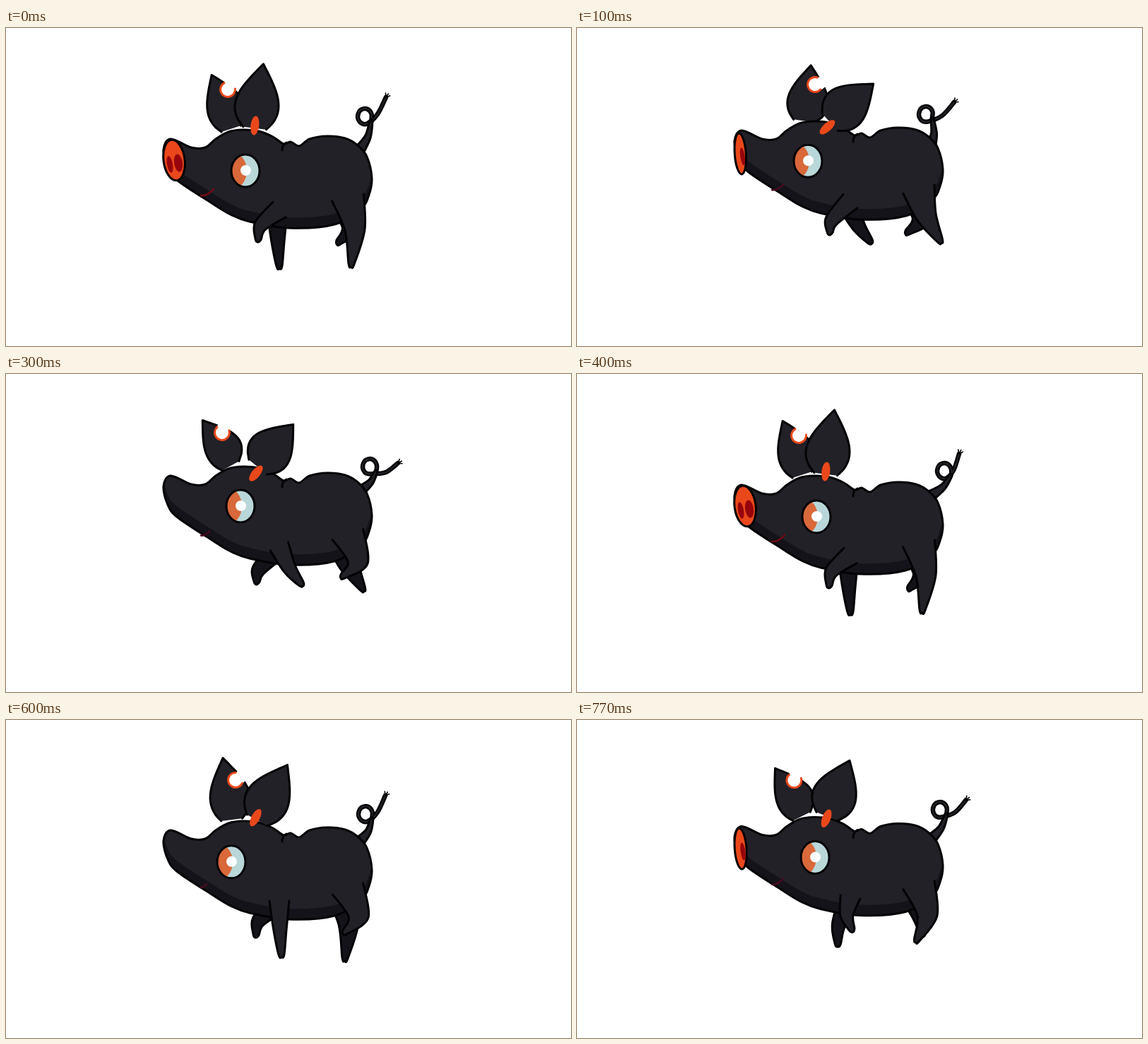
An HTML page that plays this animation: 800x450 px, repeating every 800 ms.

```html
<!DOCTYPE html>
<html lang="en">
<head>
<meta charset="utf-8">
<title>Running pig</title>
<style>
html, body { margin: 0; width: 100%; height: 100%; overflow: hidden; background: #fff; }
svg { display: block; width: 100vw; height: 100vh; }
path, ellipse { stroke-linecap: round; stroke-linejoin: round; }
</style>
</head>
<body>
<svg id="stage" viewBox="0 0 800 450"></svg>
<script>
const SKIN = '#222127', SHADE = '#15131a', INK = '#030204', ORANGE = '#ea481b', RED = '#97050c';
const torso = [
  [233, 157], [262, 169], [282, 169], [297, 157], [315, 147], [335, 144], [358, 146], [378, 154],
  [393, 164], [403, 161], [415, 167], [430, 157], [455, 153], [480, 156], [498, 166], [511, 182],
  [518, 212], [514, 236], [503, 255], [465, 278], [400, 283], [345, 274], [318, 264], [290, 247],
  [243, 216], [229, 198], [223, 172]
];

// Smooth loop through evenly spaced key values; u runs from 0 to 1.
function cycle(u, ...keys) {
  const n = keys.length, s = (u % 1) * n, i = Math.floor(s), k = s - i;
  const [a, b, c, d] = [-1, 0, 1, 2].map(j => keys[(i + j + n) % n]);
  return b + k * ((c - a) / 2 + k * (a - 2.5 * b + 2 * c - d / 2 + k * (1.5 * (b - c) + (d - a) / 2)));
}

// Smooth curve through points.
function curve(pts, closed) {
  const n = pts.length;
  const get = i => closed ? pts[(i + n) % n] : pts[Math.max(0, Math.min(n - 1, i))];
  let d = 'M' + pts[0];
  for (let i = 0; i < (closed ? n : n - 1); i++) {
    const [a, b, c, e] = [get(i - 1), get(i), get(i + 1), get(i + 2)];
    const h1 = b.map((v, j) => v + (c[j] - a[j]) / 6);
    const h2 = c.map((v, j) => v - (e[j] - b[j]) / 6);
    d += `C${h1} ${h2} ${c}`;
  }
  return d + (closed ? 'Z' : '');
}

// Tapered limb over three joints, open at the top.
function limb(joints, widths) {
  const [a, b, c] = joints;
  const heads = [[a, b], [a, c], [b, c]].map(([p, q]) => Math.atan2(q[1] - p[1], q[0] - p[0]));
  const side = sign => joints.map(([x, y], i) =>
    [x - sign * widths[i] * Math.sin(heads[i]), y + sign * widths[i] * Math.cos(heads[i])]);
  const tip = [c[0] + widths[2] * Math.cos(heads[2]), c[1] + widths[2] * Math.sin(heads[2])];
  return curve([...side(1), tip, ...side(-1).reverse()]);
}

// Leaf-shaped ear; the angle is measured from upright.
function ear(x, y, angle, length, left, right) {
  const a = angle * Math.PI / 180, cos = Math.cos(a), sin = Math.sin(a);
  const pts = [];
  for (let i = 1; i <= 19; i++) {
    const u = 1 - Math.abs(i - 10) / 10;
    const w = Math.sin(Math.PI * u ** 0.75) * (i < 10 ? -left : right);
    pts.push([x + w * cos + u * length * sin, y + w * sin - u * length * cos]);
  }
  return curve(pts.slice(0, 10)) + curve(pts.slice(9)).replace(/^M[^C]+/, '');
}

const stage = document.getElementById('stage');
function add(tag, attrs = {}, parent = stage) {
  const el = document.createElementNS('http://www.w3.org/2000/svg', tag);
  parent.appendChild(el);
  return set(el, attrs);
}
function set(el, attrs) {
  for (const name in attrs) el.setAttribute(name, attrs[name]);
  return el;
}
const shape = (fill, parent) => add('path', { fill, stroke: INK, 'stroke-width': 3 }, parent);
const line = (stroke, width, parent) => add('path', { fill: 'none', stroke, 'stroke-width': width }, parent);
const oval = (fill, width = 0, parent = stage) =>
  add('ellipse', { fill, stroke: INK, 'stroke-width': width }, parent);
const clip = (id, tag, parent) => add(tag, {}, add('clipPath', { id }, parent));
function place(el, cx, cy, rx, ry, turn = 0) {
  set(el, { cx, cy, rx, ry, transform: `rotate(${turn} ${cx} ${cy})`, visibility: rx < 1 ? 'hidden' : 'visible' });
}

const hindFar = shape(SHADE), foreFar = shape(SHADE);
const tail = line(INK, 6.5), tailIn = line(SKIN, 2), hairs = line(INK, 1.6), tailRoot = shape(SKIN);
const earFar = shape(SKIN);
const hole = oval('#fff'), cut = oval('#fff'), ring = line(ORANGE, 3);

const trunk = add('g'), outlinePath = curve(torso, true);
set(clip('trunkClip', 'path', trunk), { d: outlinePath });
add('path', { fill: SHADE, d: outlinePath }, trunk);
add('path', { fill: SKIN, d: outlinePath, transform: 'translate(0 -15)' },
  add('g', { 'clip-path': 'url(#trunkClip)' }, trunk));
set(shape('none', trunk), { d: outlinePath });
set(line(INK, 3, trunk), { d: 'M391,173Q391,165 397,162' });

const hindNear = shape(SKIN), foreNear = shape(SKIN);
const mouth = line(RED, 2.4);
const snout = oval(ORANGE, 3), nostrilA = oval(RED), nostrilB = oval(RED);
const eyeClip = clip('eyeClip', 'ellipse'), eye = oval('#b9d7d9');
const iris = oval('#d9683a', 0, add('g', { 'clip-path': 'url(#eyeClip)' }));
const rim = oval('none', 3), glint = oval('#fafefe');
const earNear = shape(SKIN), mark = oval(ORANGE);

function foreLeg(u, bob, dx, dy) {
  return limb([
    [387 + dx, 257 + bob + dy],
    [cycle(u, 360, 360, 388, 402) + dx, cycle(u, 280, 273, 298, 276) + dy],
    [cycle(u, 357, 358, 390, 418) + dx, cycle(u, 299, 289, 332, 297) + dy]
  ], [14, 9, 4]);
}

function hindLeg(u, bob, dx, dy) {
  return limb([
    [484 + dx, 240 + bob + dy],
    [cycle(u, 494, 495, 499, 498) + dx, cycle(u, 286, 267, 279, 267) + dy],
    [cycle(u, 489, 514, 480, 477) + dx, cycle(u, 334, 301, 300, 286) + dy]
  ], [23, 14, 4]);
}

// The curl swings freely over two strides.
function drawTail(u, bob) {
  const cx = cycle(u, 508, 494, 505, 515, 520, 514, 509, 517);
  const cy = cycle(u, 125, 122, 128, 131, 137, 129, 133, 129);
  const tx = cycle(u, 538, 534, 546, 555, 541, 550, 537, 560);
  const ty = cycle(u, 98, 105, 115, 126, 113, 125, 107, 127);
  const root = [501, 172 + bob * 0.5], bend = [(cx + 517) / 2, (cy + root[1]) / 2 + 5], rise = [cx + 9, cy + 7];
  const pts = [root, bend, rise];
  for (let a = -20; a >= -290; a -= 54)
    pts.push([cx + 10 * Math.cos(a * Math.PI / 180), cy + 11 * Math.sin(a * Math.PI / 180)]);
  pts.push([(cx + tx) / 2 + 3, (cy + 11 + ty) / 2 + 5], [tx, ty]);
  for (const el of [tail, tailIn]) set(el, { d: curve(pts) });
  set(tailRoot, { d: limb([root, bend, rise], [7, 4, 2]) });
  const dir = Math.atan2(ty - cy - 16, tx - cx);
  set(hairs, {
    d: [-0.7, 0, 0.6].map(a => `M${tx},${ty}l${6 * Math.cos(dir + a)},${6 * Math.sin(dir + a)}`).join('')
  });
}

function drawEars(u, bob) {
  const tilt = cycle(u, 7, 48, 28, 39);
  set(earNear, { d: ear(352, 152 + bob, tilt, cycle(u, 102, 91, 99, 87), 33, 29) });
  place(mark, 352 + tilt * 0.05, 138 - bob * 0.2, 6, 13.5, tilt);
  set(earFar, {
    d: ear(319, 152 + bob, cycle(u, -18, 8, -7, -29), cycle(u, 90, 88, 98, 84),
      cycle(u, 22, 26, 25, 19), 32)
  });

  const x = cycle(u, 314, 337, 325, 306), y = cycle(u, 87, 80, 85, 83);
  const gap = cycle(u, -62, -15, -32, -75);
  const at = (turn, r) => {
    const a = (gap + turn) * Math.PI / 180;
    return [x + r * Math.cos(a), y + r * Math.sin(a)];
  };
  place(hole, x, y, 10, 10);
  place(cut, ...at(0, 7), 9, 9);
  set(ring, { d: `M${at(57, 10.5)}A10.5,10.5 0 1 1 ${at(-57, 10.5)}` });
}

function drawFace(u, bob) {
  const x = cycle(u, 339, 327, 319, 332), y = 202 + bob * 1.15;
  for (const el of [eye, eyeClip, rim]) place(el, x, y, 20, 23);
  place(iris, x - 17, y, 19, 25);
  place(glint, x + 0.5, y - 0.5, 7.5, 7.5);

  const rx = cycle(u, 15, 8, -7, 0), sx = 223.5 + rx * 0.97, sy = 187 + bob * 0.75;
  place(snout, sx, sy, rx, 29, -rx / 2);
  place(nostrilA, sx - rx * 0.4, sy + 6, rx > 10 ? rx * 0.27 : 0, 12, -10);
  place(nostrilB, sx + rx * 0.4, sy + 4, rx * 0.4, 12.5, -8);

  const w = cycle(u, 18, 17, 8, 12);
  set(mouth, {
    d: `M276,${237 + bob * 0.65}q${w / 2},1 ${w},${-w / 2}`,
    stroke: rx > 10 ? '#7a0812' : '#4d0a1f'
  });
}

function draw(time) {
  const t = time % 800;
  const step = Math.floor(t / 100) * 2 + (t % 100 >= 70 ? 1 : 0);
  const u = step / 8 % 1, bob = cycle(u, 0, -12, -1, -13);
  set(trunk, { transform: `translate(0 ${bob})` });
  // Far legs run half a stride behind the near ones.
  set(foreNear, { d: foreLeg(u, bob, 0, 0) });
  set(foreFar, { d: foreLeg(u + 0.5, bob, -3, 5) });
  set(hindNear, { d: hindLeg(u, bob, 0, 0) });
  set(hindFar, { d: hindLeg(u + 0.5, bob, -9, 3) });
  drawTail(step / 16, bob);
  drawEars(u, bob);
  drawFace(u, bob);
}

const start = performance.now();
function tick() {
  draw(performance.now() - start);
  requestAnimationFrame(tick);
}
tick();
</script>
</body>
</html>
```
